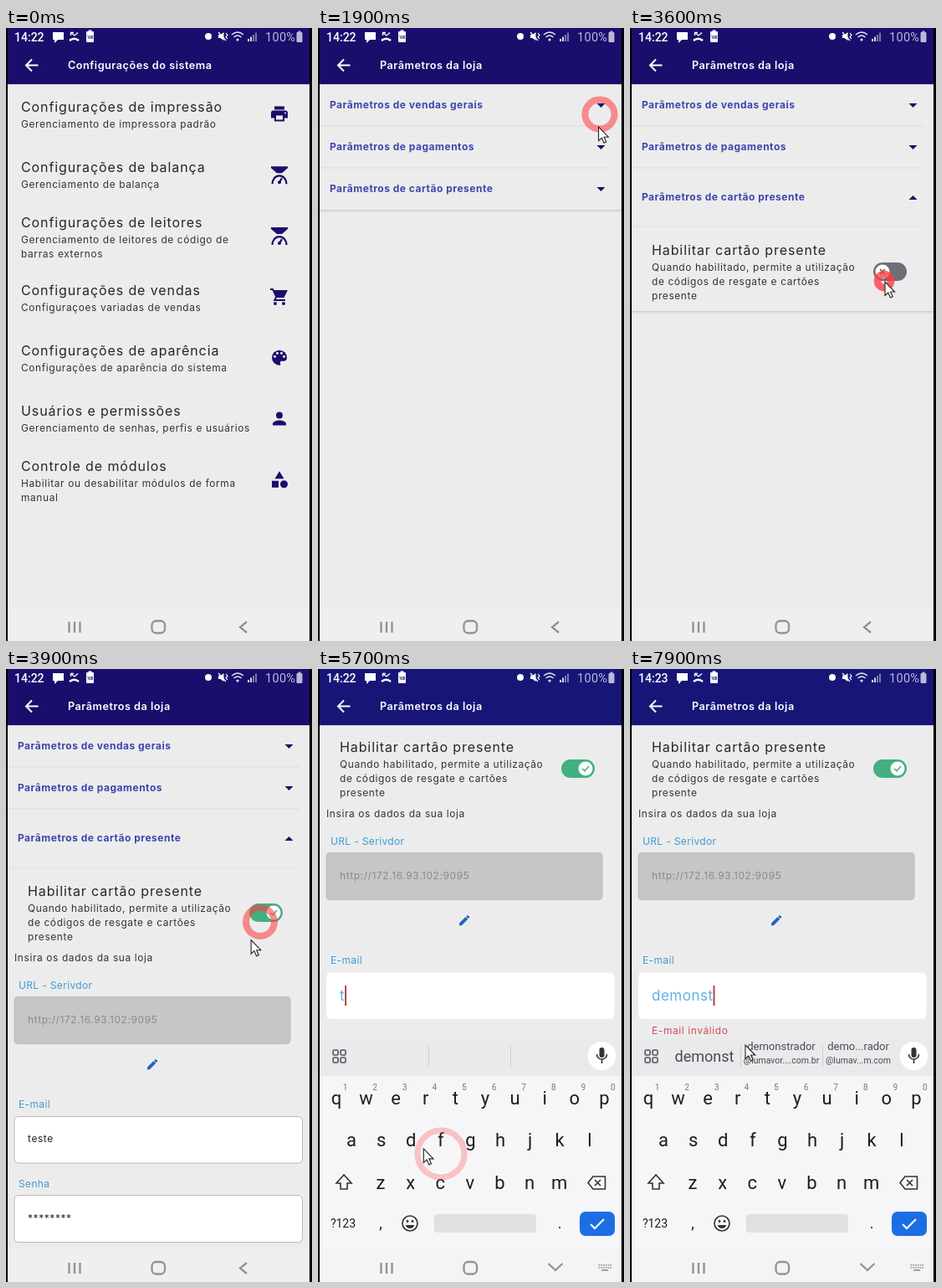
An HTML page with a canvas that plays this animation: 366x732 px, repeating every 8000 ms.

```html
<!DOCTYPE html>
<html lang="pt-BR">
<head>
<meta charset="utf-8">
<title>Parâmetros da loja</title>
<style>
html, body { margin: 0; width: 100%; height: 100%; overflow: hidden; background: #000; }
canvas { display: block; width: 366px; height: 732px; }
</style>
</head>
<body>
<canvas id="stage"></canvas>
<script>
const W = 366, H = 732, LOOP = 8000;
const NAVY = '#1a0e6c', BG = '#ececec', INK = '#262626', LINK = '#3d45ae', SKY = '#3f9bd8';
const UI = 'Inter, sans-serif', KEYS = 'Roboto, sans-serif';
const cv = document.getElementById('stage'), c = cv.getContext('2d');
const dpr = window.devicePixelRatio || 1;
cv.width = W * dpr;
cv.height = H * dpr;

// progress of a span of time, eased at both ends
const ease = (t, from, to) => {
  const p = Math.min(1, Math.max(0, (t - from) / (to - from)));
  return p * p * (3 - 2 * p);
};

function text(s, x, y, size, color, o = {}) {
  c.font = `${o.weight || 400} ${size}px ${o.font || UI}`;
  c.letterSpacing = (o.gap || 0) + 'px';
  c.textAlign = o.align || 'left';
  c.fillStyle = color;
  c.fillText(s, x, y);
}
const title = (s, x, y) => text(s, x, y + 6, 16, INK, { gap: 0.9 });
const body = (s, x, y, color = '#333') => text(s, x, y + 4, 11.9, color, { gap: 0.63 });
const label = (s, x, y) => text(s, x, y + 4, 12, SKY, { gap: 0.35 });
const key = (s, x, y, size = 22, color = '#1d1d1f') =>
  text(s, x, y, size, color, { font: KEYS, align: 'center' });

function rect(x, y, w, h, color) {
  c.fillStyle = color;
  c.fillRect(x, y, w, h);
}
function round(x, y, w, h, r, fill, stroke) {
  c.beginPath();
  c.roundRect(x, y, w, h, r);
  if (fill) { c.fillStyle = fill; c.fill(); }
  if (stroke) { c.strokeStyle = stroke; c.stroke(); }
}
function dot(x, y, r, color) {
  c.beginPath();
  c.arc(x, y, r, 0, 7);
  c.fillStyle = color;
  c.fill();
}
function line(d, color, width = 2) {
  c.strokeStyle = color;
  c.lineWidth = width;
  c.stroke(new Path2D(d));
  c.lineWidth = 1;
}
function shape(d, color) {
  c.fillStyle = color;
  c.fill(new Path2D(d));
}
// runs draw in a shifted and scaled space
function at(x, y, scale, draw) {
  c.save();
  c.translate(x, y);
  c.scale(scale, scale);
  draw();
  c.restore();
}
function clip(x, y, w, h, draw) {
  c.save();
  c.beginPath();
  c.rect(x, y, w, h);
  c.clip();
  draw();
  c.restore();
}

const icons = {
  print() {
    shape('M6 3h12v4H6zM5 8h14a3 3 0 0 1 3 3v6h-4v4H6v-4H2v-6a3 3 0 0 1 3-3z', NAVY);
    rect(8, 14, 8, 5, BG);
    dot(19, 11, 1, BG);
  },
  scale() {
    shape('M2 2h20v2l-7 6H9L2 4z', NAVY);
    line('M3.500 23a8.500 10 0 0 1 17 0M12 21l3-5', NAVY, 2.2);
    dot(12, 21, 2, NAVY);
  },
  cart() {
    shape('M5 4h17l-4.500 9H8z', NAVY);
    line('M1 3h3l4.300 9-2 4H19', NAVY, 2);
    dot(7, 20, 2, NAVY);
    dot(17, 20, 2, NAVY);
  },
  palette() {
    dot(12, 12, 9, NAVY);
    shape('M13 21.500q1-2-.3-3.500 0-2 2-2H17q2.500 0 4.500-2V22z', BG);
    for (const [x, y] of [[6.5, 10.5], [9.5, 6.5], [14.5, 6.5], [17.5, 10.5]]) dot(x, y, 1.5, BG);
  },
  person() {
    dot(12, 8, 4, NAVY);
    shape('M4 20v-2c0-2.700 5.300-4 8-4s8 1.300 8 4v2z', NAVY);
  },
  shapes() {
    shape('M12 2l5.500 9h-11zM3 13.500h8v8H3z', NAVY);
    dot(17.5, 17.5, 4.5, NAVY);
  },
};

const menu = [
  [94, 'print', 'Configurações de impressão', 'Gerenciamento de impressora padrão'],
  [166, 'scale', 'Configurações de balança', 'Gerenciamento de balança'],
  [232, 'scale', 'Configurações de leitores', 'Gerenciamento de leitores de código de', 'barras externos'],
  [313, 'cart', 'Configurações de vendas', 'Configuraçoes variadas de vendas'],
  [385, 'palette', 'Configurações de aparência', 'Configurações de aparência do sistema'],
  [457, 'person', 'Usuários e permissões', 'Gerenciamento de senhas, perfis e usuários'],
  [523, 'shapes', 'Controle de módulos', 'Habilitar ou desabilitar módulos de forma', 'manual'],
];

function menuPage() {
  rect(2, 67, 361, 625, BG);
  menu.forEach(([y, icon, head, ...rows], i) => {
    title(head, 18, y);
    rows.forEach((s, n) => body(s, 18, y + 21 + n * 17));
    at(315, 90.5 + i * 72.8, 1, icons[icon]);
  });
}

function toggle(x, y, on) {
  round(x, y - 11, 40, 22, 11, on > 0.5 ? '#42b07f' : '#6e6f77');
  const kx = x + 11 + 18 * on;
  dot(kx, y, 8.5, '#fff');
  if (on > 0.5) line(`M${kx - 4} ${y}l3 3 5-6`, '#42b07f', 1.5);
  else line(`M${kx - 3} ${y - 3}l6 6m0-6l-6 6`, '#55565e', 1.5);
}

function panelHead(s, y, open) {
  const h = 50 + 20 * open, my = y + h / 2;
  text(s, 14, my + 4, 12, LINK, { weight: 700, gap: 0.5 });
  c.save();
  c.translate(338.5, my + 0.5);
  c.rotate(Math.PI * open);
  shape('M-5-2.500H5L0 2.500z', NAVY);
  c.restore();
  return y + h;
}
const rule = (y, color = '#dedede') => rect(2, Math.round(y) - 0.5, 350, 1, color);

function salesBody(y) {
  title('Utilizar segunda via do cupom', 18, y + 20);
  body('Quando habilitado, permite a impressão', 18, y + 41);
  body('da segunda via do cupom', 18, y + 58);
  toggle(299, y + 37, 0);
  title('Quantidade no auto', 18, y + 95);
  title('atendimento', 18, y + 119);
  body('Quando habilitado, permite ao', 18, y + 139);
  body('consumidor controlar a quantidade de', 18, y + 156);
  body('produtos no auto atendimento', 18, y + 173);
  toggle(299, y + 131, 1);
  title('Checkout automático em', 18, y + 210);
}

function cardBody(y, t) {
  title('Habilitar cartão presente', 26, y + 28);
  body('Quando habilitado, permite a utilização', 26, y + 49);
  body('de códigos de resgate e cartões', 26, y + 66);
  body('presente', 26, y + 83);
  toggle(291, y + 54, ease(t, 3650, 3760));
  if (t < 3700) return;
  body('Insira os dados da sua loja', 10, y + 108);
  label('URL - Serivdor', 15, y + 141);
  round(10, y + 154.5, 330, 56, 4, '#c6c6c6', '#bababa');
  body('http://172.16.93.102:9095', 26, y + 182, '#8a8a8a');
  at(167, y + 227, 0.68, () =>
    shape('M3 17v4h4L18 10l-4-4zM20.700 7q.700-.700 0-1.400L18.400 3.300q-.700-.700-1.400 0L15 5.200 18.800 9z', '#1c62c4'));
  label('E-mail', 15, y + 283);
  const focus = t >= 5000;
  round(10, y + 297.5, 344.5, 55.5, 5, '#fff', focus ? '#f4f4f4' : '#b8b8b8');
  if (focus) {
    const s = typed(t);
    text(s, 26, y + 331, 17, '#5cb2df', { gap: 0.5 });
    rect(26 + c.measureText(s).width, y + 313, 2, 24, '#b5404c');
    c.globalAlpha = ease(t, 6050, 6320);
    body('E-mail inválido', 26, y + 367, '#cc4f5d');
    c.globalAlpha = 1;
    y += 22; // room for the error line
  } else body('teste', 26, y + 324, INK);
  label('Senha', 15, y + 378);
  round(10, y + 391.5, 344.5, 56, 5, '#fff', '#b8b8b8');
  body('********', 26, y + 419, INK);
}

const strokes = [5900, 6150, 6450, 6600, 6850, 7050, 7290];
function typed(t) {
  if (t < 5750) return 'teste'.slice(0, 5 - Math.max(0, Math.floor((t - 5400) / 70)));
  return 'demonst'.slice(0, strokes.filter(k => t >= k).length);
}

function storePage(t) {
  const p1 = 1 - ease(t, 1600, 1800), p3 = ease(t, 2545, 2745);
  const fields = ease(t, 3700, 3880);
  rect(2, 67, 361, 625, BG);
  c.save();
  c.translate(0, -172 * ease(t, 5250, 5500));
  let y = panelHead('Parâmetros de vendas gerais', 67, p1);
  if (p1) {
    rule(y, '#e3e3e3');
    clip(2, y, 361, 210 * p1, () => salesBody(y));
  }
  y += 210 * p1;
  rule(y);
  y = panelHead('Parâmetros de pagamentos', y, 0);
  rule(y);
  y = panelHead('Parâmetros de cartão presente', y, p3);
  if (p3) {
    rule(y, '#e3e3e3');
    clip(2, y, 361, 101 * p3 + 360 * fields, () => cardBody(y, t));
  }
  y += 101 * p3 + 360 * fields;
  if (!fields) {
    rect(2, y, 361, 1.5, '#cfcfcf');
    rect(2, y + 1.5, 361, 1.5, '#e0e0e0');
  }
  c.restore();
}

function statusBar(t, color) {
  rect(2, 0, 361, 67, color);
  rect(2, 67, 361, 1, '#c9c7d6');
  text(t < 6900 ? '14:22' : '14:23', 10, 16, 14, '#fff', { font: KEYS, weight: 500 });
  shape('M56 5h13v9H62l-4 4v-4h-2z', '#fff');
  line('M77.500 9V5.500h3.500M78 6l4 3 4-3.500', '#fff', 1.3);
  line('M76 15q5.500-4.500 11 0', '#fff', 2.6);
  round(96, 4, 9, 13, 1, '#fff');
  rect(98.5, 2.5, 4, 2, '#fff');
  text('100', 100.5, 13, 4.5, NAVY, { font: KEYS, weight: 700, align: 'center' });
  dot(242, 10, 4, '#fff');
  shape('M254 8h2.500l4-3v10l-4-3H254z', '#fff');
  line('M254 5l9 10M263 6l2 2.500-2 2 2 2.500', '#fff', 1.2);
  line('M270 8q7-6 14 0M272.500 11q4.500-4 9 0', '#e6e3f4', 1.4);
  dot(277, 14, 1.6, '#e6e3f4');
  for (let i = 0; i < 4; i++) rect(289 + i * 3, 13 - i * 2.5, 2, 3 + i * 2.5, i < 2 ? '#d8d4ee' : '#8078b0');
  text('100%', 310, 16, 14.5, '#bdb8da', { font: KEYS, gap: 0.3 });
  round(347.5, 5, 7, 12, 1, '#bdb8da');
  rect(349.5, 3.5, 3, 2, '#bdb8da');
  line('M38.500 44.500H24M31 37.500l-7 7 7 7', '#fff', 2);
  const head = t < 480 ? 'Configurações do sistema' : 'Parâmetros da loja';
  text(head, 74, 49, 12.7, '#fff', { weight: 600, gap: 0.5 });
}

function navBar(kb) {
  rect(2, 692, 361, 40, kb ? '#f4f4f6' : '#efefef');
  const gray = '#929292';
  line('M75.500 709v13M82 709v13M88.500 709v13', gray, 2.3);
  c.lineWidth = 2.3;
  round(174.5, 708, 15.5, 14.5, 5, null, gray);
  c.lineWidth = 1;
  if (!kb) return line('M288 709l-8 6.500 8 6.500', gray, 2.3);
  line('M275.500 710l8.500 8 8.500-8', gray, 2.3);
  for (let r = 0; r < 2; r++) for (let i = 0; i < 6; i++) rect(335.5 + i * 2.8, 711 + r * 3, 1.6, 1.6, gray);
  rect(339, 717, 8, 1.6, gray);
}

function suggestions(t) {
  const s = t < 5950 ? '' : typed(t - 150), gray = '#4b4b50';
  if (!s) return;
  key(s.length < 3 ? 'd' : s, 89, 469, 18, gray);
  if (s.length < 3) {
    key('de', 181, 469, 18, gray);
    key('depois', 273, 469, 18, gray);
    return;
  }
  key('demonstrador', 181, 455, 13, gray);
  key('@lumavor....com.br', 181, 471, 10.5, gray);
  key('demo...rador', 273, 455, 13, gray);
  key('@lumav...m.com', 273, 471, 10.5, gray);
}

const keyRows = [['qwertyuiop', 22, 520], ['asdfghjkl', 40, 570], ['zxcvbnm', 75, 621]];
function keyboard(t) {
  rect(2, 440, 361, 292, '#f6f6f8');
  rect(2, 440, 361, 46, '#eaeaed');
  c.lineWidth = 1.6;
  for (const x of [18, 27]) for (const y of [455, 464]) round(x, y, 6, 6, 1.5, null, '#55565a');
  c.lineWidth = 1;
  rect(132, 450, 1, 25, '#cfcfd3');
  rect(230, 450, 1, 25, '#cfcfd3');
  suggestions(t);
  dot(339.5, 462, 17, '#fff');
  round(336.5, 452, 6, 12, 3, '#333');
  line('M333.500 460a6 6 0 0 0 12 0M339.500 466v5', '#333', 1.6);
  keyRows.forEach(([chars, x, y], row) => [...chars].forEach((ch, i) => {
    key(ch, x + i * 35.6, y);
    if (!row) key(String((i + 1) % 10), x + 10.5 + i * 35.6, 503, 10, '#77777c');
  }));
  line('M31 604l-9 10h5v7h8v-7h5z', '#333', 1.6);
  line('M329 606h14.500v15H329l-6-7.500zM331 610l7 7m0-7l-7 7', '#333', 1.6);
  key('?123', 30, 667, 14);
  key(',', 75, 668, 18);
  key('.', 289, 668, 18);
  c.lineWidth = 1.7;
  c.strokeStyle = '#333';
  c.beginPath();
  c.arc(110, 662, 9, 0, 7);
  c.stroke();
  dot(107, 659.5, 1.4, '#333');
  dot(113, 659.5, 1.4, '#333');
  shape('M105 664h10a5 4 0 0 1-10 0z', '#333');
  round(139, 651, 122, 22, 4, '#e0e0e3');
  round(313, 648, 42, 29, 7, '#1b6fe3');
  line('M326 663l5 5 11-11', '#fff', 2);
}

const path = [
  [100, 105, 306], [450, 105, 306], [1100, 288, 215], [1450, 337, 103], [1750, 337, 103],
  [2350, 328, 199], [2450, 328, 200], [2600, 329, 208], [2850, 329, 208], [3450, 305, 303],
  [3750, 305, 303], [4650, 147, 579], [5300, 147, 579], [6000, 113, 569], [7250, 113, 569],
  [7850, 138, 449], [8000, 138, 449],
];
function pointer(t) {
  if (t < path[0][0]) return;
  const i = path.findIndex(k => k[0] > t);
  const [t0, x0, y0] = path[i - 1], [t1, x1, y1] = path[i];
  const p = ease(t, t0, t1);
  at(x0 + (x1 - x0) * p, y0 + (y1 - y0) * p, 1, () => {
    const arrow = 'M0 0v16.500l3.800-3.500 2.700 6 2.700-1.200-2.700-5.800h5.200z';
    shape(arrow, '#fff');
    line(arrow, '#222', 1.1);
  });
}

const taps = [[400, 105, 306], [1500, 337, 103], [2420, 328, 200], [3520, 304, 302], [4950, 147, 579]];
function ripples(t) {
  for (const [start, x, y] of taps) {
    const p = (t - start) / 800;
    if (p < 0 || p >= 1) continue;
    c.globalAlpha = 0.85 - 0.6 * p;
    c.strokeStyle = '#ff3b43';
    c.lineWidth = 9 - 2 * p;
    c.beginPath();
    c.arc(x, y, 5.5 + 24 * p, 0, 7);
    c.stroke();
    c.globalAlpha = c.lineWidth = 1;
  }
}

function draw(t) {
  c.setTransform(dpr, 0, 0, dpr, 0, 0);
  rect(0, 0, W, H, '#000');
  const enter = ease(t, 420, 680), kb = ease(t, 5120, 5350);
  clip(2, 67, 361, 625, () => {
    if (enter < 1) menuPage();
    if (!enter) return;
    c.globalAlpha = enter;
    c.translate(0, 120 * (1 - enter));
    storePage(t);
    c.globalAlpha = 1;
  });
  statusBar(t, kb ? '#171677' : NAVY);
  if (kb) at(0, 292 * (1 - kb), 1, () => keyboard(t));
  navBar(kb > 0);
  ripples(t);
  pointer(t);
}

function tick(now) {
  draw(now % LOOP);
  requestAnimationFrame(tick);
}
draw(0);
requestAnimationFrame(tick);
</script>
</body>
</html>
```
